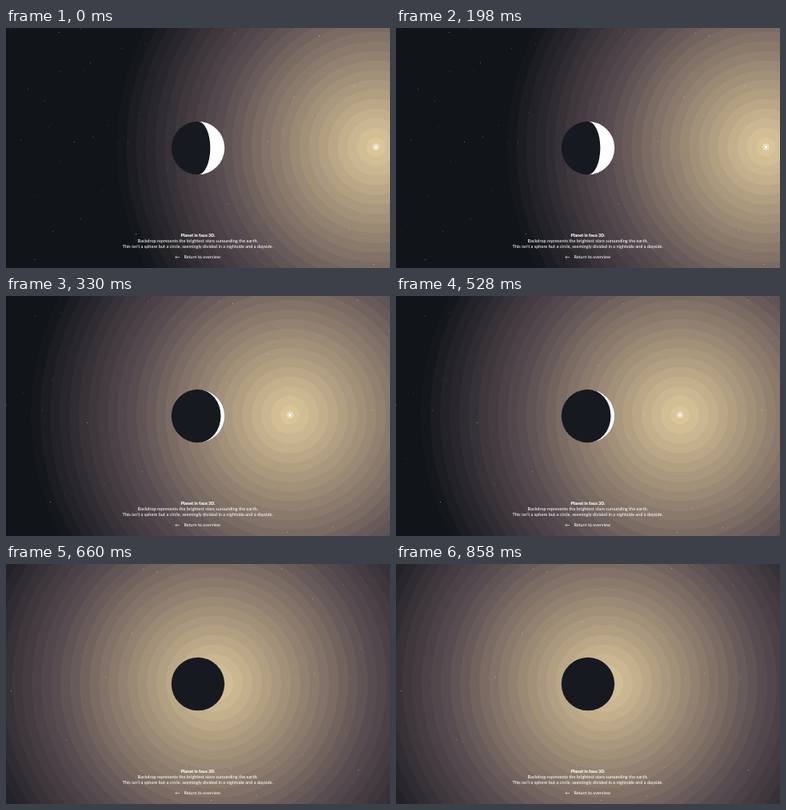
Recreate the animation shown at these times as an HTML page with a canvas. Size 480x300 px, loop 0.99 s.

```html
<!DOCTYPE html>
<html lang="en">
<head>
<meta charset="utf-8">
<title>Planet in faux 3D</title>
<style>
  html, body { margin: 0; width: 100%; height: 100%; overflow: hidden; background: #11151a; }
  canvas, svg { position: absolute; left: 0; top: 0; width: 480px; height: 300px; display: block; }
  text { font: 500 5.58px Lato, "Open Sans", sans-serif; fill: #fff; text-rendering: geometricPrecision; }
  .title { font-weight: 900; font-size: 5.4px; }
  .link { font-size: 5.4px; }
</style>
</head>
<body>
<canvas id="sky" width="480" height="300"></canvas>
<svg viewBox="0 0 480 300">
  <g text-anchor="middle">
    <text class="title" x="240" y="261.3">Planet in faux 3D.</text>
    <text x="239.7" y="268">Backdrop represents the brightest stars surounding the earth.</text>
    <text x="239.7" y="274.7">This isn't a sphere but a circle, seemingly divided in a nightside and a dayside.</text>
    <text class="link" x="245.3" y="288">Return to overview</text>
  </g>
  <path d="M217 286.5H211.8M213.4 285L211.8 286.5L213.4 288" fill="none" stroke="#fff" stroke-width=".6"/>
</svg>
<script>
const W = 480, H = 300, STEP = 330;
const BAND = 12, REACH = 324;
const ctx = document.getElementById('sky').getContext('2d');
const planet = { x: 240, y: 150, r: 33.3 };
const offsets = [222.5, 115, 20]; // sun's distance right of the planet

const warm = [222, 201, 155], dusk = [88, 75, 80], night = [17, 21, 26];
const mix = (a, b, k) => `rgb(${a.map((v, i) => Math.round(v + (b[i] - v) * k))})`;

function glowAt(d) {
  const bend = 200;
  return d < bend ? mix(warm, dusk, d / bend) : mix(dusk, night, (d - bend) / (REACH - bend));
}

function seeded(seed) {
  return () => (seed = seed * 16807 % 2147483647) / 2147483647;
}
const rand = seeded(77);
const stars = Array.from({ length: 90 }, () => ({
  x: rand() * W, y: rand() * H, alpha: 0.08 + 0.45 * rand() ** 3
}));

function disc(x, y, r, color) {
  ctx.fillStyle = color;
  ctx.beginPath();
  ctx.arc(x, y, r, 0, Math.PI * 2);
  ctx.fill();
}

function drawStars(shift) {
  for (const s of stars) {
    ctx.fillStyle = `rgba(255,245,235,${s.alpha})`;
    ctx.fillRect(Math.floor((s.x + shift) % W), Math.floor(s.y), 1, 1);
  }
}

function drawSun(x, y) {
  ctx.strokeStyle = '#fff';
  ctx.lineWidth = 1.1;
  ctx.beginPath();
  for (let i = 0; i < 8; i++) {
    const a = i * Math.PI / 4, c = Math.cos(a), s = Math.sin(a);
    ctx.moveTo(x + c * 2.4, y + s * 2.4);
    ctx.lineTo(x + c * 4.3, y + s * 4.3);
  }
  ctx.stroke();
  disc(x, y, 1.8, '#fff');
}

// The nightside grows as the sun moves behind the planet
function drawPlanet(offset) {
  const { x, y, r } = planet, q = Math.PI / 2;
  const bulge = r * (1 - (offset / 303) ** 2);
  disc(x, y, r, '#16191f');
  ctx.fillStyle = '#fff';
  ctx.beginPath();
  ctx.arc(x, y, r, -q, q);
  ctx.ellipse(x, y, bulge, r, 0, q, -q, true);
  ctx.fill();
}

function draw(offset) {
  const sx = planet.x + offset, sy = 148.7;
  ctx.fillStyle = mix(night, night, 0);
  ctx.fillRect(0, 0, W, H);
  for (let r = REACH; r > 0; r -= BAND) disc(sx, sy, r, glowAt(r - BAND / 2));
  drawStars(offset);
  drawSun(sx, sy);
  drawPlanet(offset);
}

let start, shown = 0;
function tick(now) {
  start ??= now;
  const step = Math.floor((now - start) / STEP) % offsets.length;
  if (step !== shown) draw(offsets[shown = step]);
  requestAnimationFrame(tick);
}
draw(offsets[0]);
requestAnimationFrame(tick);
</script>
</body>
</html>
```
